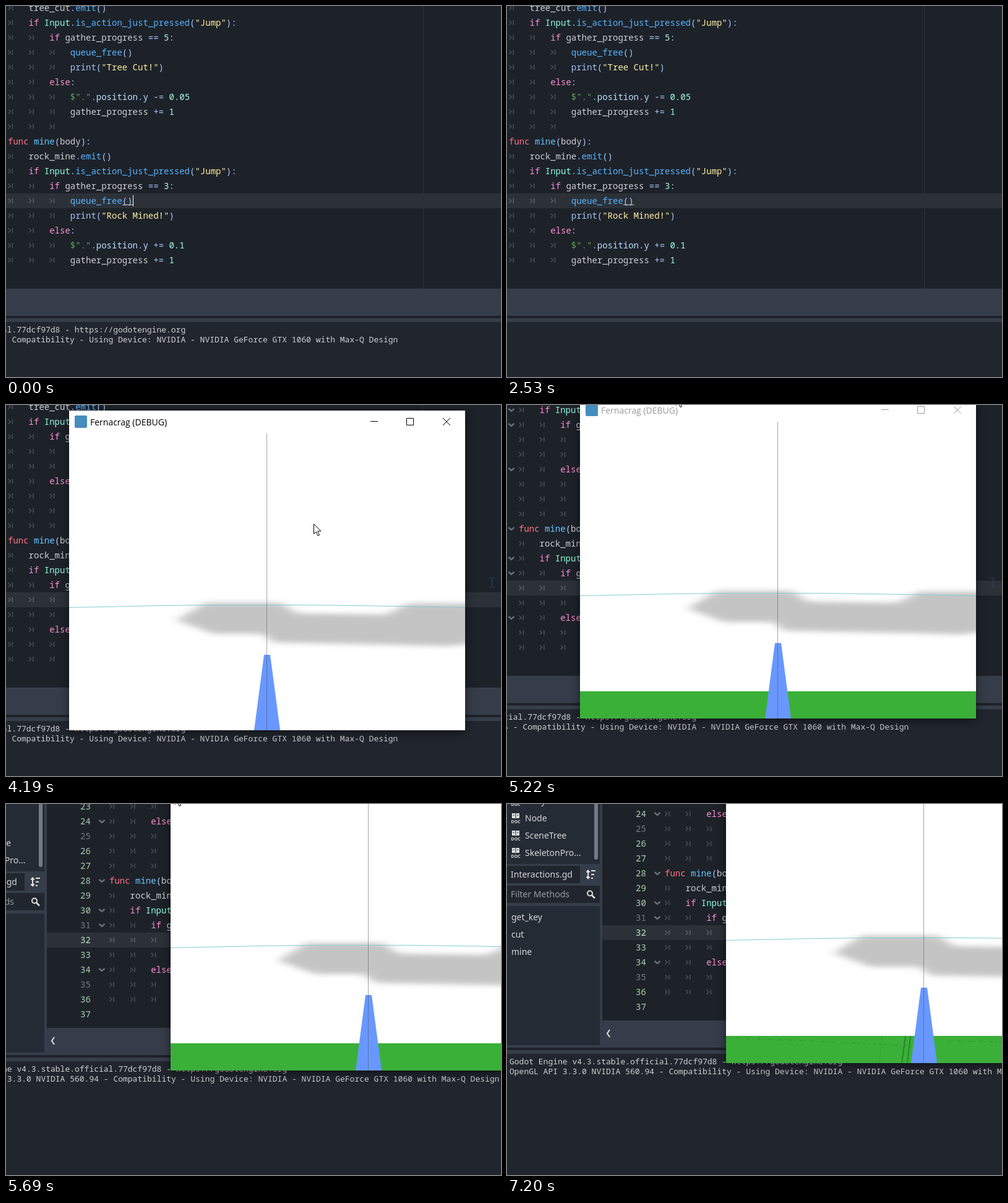
Recreate the animation shown at these times as an HTML page. Size 800 by 600 pixels, loop 8 s.

```html
<!DOCTYPE html>
<html lang="en">
<head>
<meta charset="utf-8">
<title>Script editor and game window</title>
<style>
html, body { margin: 0; width: 100%; height: 100%; overflow: hidden; background: #21262e; }
svg { display: block; width: 800px; height: 600px; }
text { white-space: pre; }
.code { font: 14px "Noto Sans Mono", "DejaVu Sans Mono", monospace; fill: #cdcfd2; }
.log { font: 13px "Noto Sans Mono", "DejaVu Sans Mono", monospace; fill: #cdcfd2; }
.ui { font: 14px "Noto Sans", "Open Sans", sans-serif; fill: #d2d4d8; }
.title { font: 14px "Open Sans", "Noto Sans", sans-serif; }
.line { fill: none; }
</style>
</head>
<body>
<svg viewBox="0 0 800 600">
  <defs>
    <filter id="soft" x="-20%" y="-60%" width="140%" height="220%"><feGaussianBlur stdDeviation="9 4"/></filter>
    <filter id="shade" x="-10%" y="-10%" width="120%" height="120%"><feGaussianBlur stdDeviation="8"/></filter>
    <clipPath id="view"><rect x="102" y="46" width="640" height="480"/></clipPath>
    <path id="tab" class="line" d="M3.5-3.5l3.5 3.5l-3.5 3.5M10.3-4v8" stroke-width="1.7"/>
    <path id="fold" class="line" d="M-13.5-2l4.5 4l4.5-4" stroke="#6a7078" stroke-width="2.4"/>
    <g id="doc">
      <path d="M8-8h5l1 1l1-1h5v8h-5l-1 1l-1-1h-5z" fill="#e0e0e0"/>
      <path class="line" d="M14-7v7M9.5-5h2.5M16-5h2.5" stroke="#252b34"/>
      <text x="6.6" y="8" font-family="Noto Sans, sans-serif" font-size="7" font-weight="800" fill="#e0e0e0">DOC</text>
    </g>
  </defs>
  <g id="scene">
    <rect x="-300" width="1200" height="720" fill="#21262e"/>
    <rect x="-300" width="1200" height="511" fill="#363d4a"/>
    <rect x="-300" y="501" width="1200" height="4" fill="#1d2229"/>
    <rect x="-98" width="998" height="457" fill="#1d2229"/>
    <rect x="-98" y="303" width="998" height="24" fill="#2c3138"/>
    <rect x="674" width="1" height="457" fill="#2b3037"/>
    <path class="line" d="M-86 472l-4 6l4 6" stroke="#e0e0e0" stroke-width="2"/>
    <g id="code" class="code"></g>
    <rect x="188" y="321" width="17" height="1" fill="#cdcfd2"/>
    <rect id="caret" x="205" y="306" width="1" height="18" fill="#fff"/>

    <g id="side" class="ui" transform="translate(-252 107)">
      <rect y="-110" width="150" height="207" fill="#252b34"/>
      <rect x="141" y="-110" width="6" height="200" rx="3" fill="#757a82"/>
      <rect y="100" width="118" height="28" fill="#21262e"/>
      <rect y="132" width="150" height="28" fill="#21262e"/>
      <rect y="165" width="150" height="225" fill="#252b34"/>
      <text x="6" y="119">Interactions.gd</text>
      <text x="6" y="151" fill="#959aa1">Filter Methods</text>
      <path class="line" d="M131 108v12M128.500 110.500l2.500-3l2.500 3M128.500 117.500l2.500 3l2.500-3M136 108h7M136 114h5M136 120h3" stroke="#e0e0e0" stroke-width="2"/>
      <circle cx="134" cy="144.500" r="4" fill="none" stroke="#e0e0e0" stroke-width="2"/>
      <path d="M137 147.500l5 5" stroke="#e0e0e0" stroke-width="2.500"/>
    </g>

    <g id="log" class="log">
      <text x="-248" y="528">Godot Engine v4.3.stable.official.77dcf97d8 - https://godotengine.org</text>
      <text x="-248" y="544">OpenGL API 3.3.0 NVIDIA 560.94 - Compatibility - Using Device: NVIDIA - NVIDIA GeForce GTX 1060 with Max-Q Design</text>
    </g>

    <g id="game">
      <rect x="102" y="15" width="640" height="515" fill="#000" opacity=".5" filter="url(#shade)"/>
      <rect x="102" y="9" width="640" height="517" fill="#fff"/>
      <rect id="icon" x="111" y="17" width="20" height="20" rx="2" fill="#478cbf"/>
      <text id="title" class="title" x="136" y="33">Fernacrag (DEBUG)</text>
      <path id="buttons" class="line" d="M589 26.500h12M647.500 21.500h11v11h-11zM706 21l12 12M718 21l-12 12"/>
      <rect id="splash" x="102" y="46" width="640" height="480" fill="#242424"/>
      <g id="world" clip-path="url(#view)">
        <path filter="url(#soft)" fill="#c4c4c4" d="M276 348L322 320H445L470 337L615 339L650 321H790V382L715 390L640 388L432 384L415 370H335Z"/>
        <path class="line" d="M102 327.500L180 326L245 324.500L336 323.500H494L600 325L742 327.500" stroke="#84ccd0"/>
        <g id="grass">
          <rect x="102" y="482" width="640" height="44" fill="#3ab038"/>
          <g id="marks" class="line" stroke="#237a23">
            <path d="M102 485Q240 490 400 498M460 490L742 496" stroke-dasharray="5 4 2 6" opacity=".6"/>
            <path d="M392 483L386 526M400 483L395 526" stroke-width="2" opacity=".75"/>
            <path d="M354 483L350 526" opacity=".3"/>
          </g>
        </g>
        <path d="M417 404h10L443 526H401Z" fill="#6898ff"/>
        <path id="axis" d="M421.500 46V526"/>
      </g>
    </g>
  </g>
  <path id="beam" class="line" d="M782 279.500h2.500l1 1l1-1h2.500M785.500 280v14M782 294.500h2.500l1-1l1 1h2.500" stroke="#34416c"/>
  <path id="mouse" d="M.5.500V16.500L4.200 13L7 19.500L9.500 18.400L6.800 12H12Z" fill="#fff" stroke="#000"/>
</svg>
<script>
const LOOP = 8000;
const $ = id => document.getElementById(id);

function add(parent, name, attrs, text) {
  const el = document.createElementNS("http://www.w3.org/2000/svg", name);
  for (const key in attrs) el.setAttribute(key, attrs[key]);
  if (text) el.textContent = text;
  return parent.appendChild(el);
}

// Syntax colours, tried in order at each position.
const SYNTAX = [
  [/^\$"\."/, "#5ea258"],
  [/^"[^"]*"/, "#ffeda1"],
  [/^(if|else)\b/, "#ff8ccc"],
  [/^func\b/, "#ff7085"],
  [/^Input\b/, "#8fffdb"],
  [/^mine\b/, "#66c8ff"],
  [/^print\b/, "#a3c2f5"],
  [/^[a-z_]+(?=\()/, "#57b3ff"],
  [/^(position|y)\b/, "#bce0ff"],
  [/^\d+(\.\d+)?/, "#a1ffe0"],
  [/^[.():+=-]+/, "#abc9ff"],
  [/^(\w+|\s+)/, "#cdcfd2"]
];

const FIRST = 19;
const SOURCE = `\ttree_cut.emit()
\tif Input.is_action_just_pressed("Jump"):
\t\tif gather_progress == 5:
\t\t\tqueue_free()
\t\t\tprint("Tree Cut!")
\t\telse:
\t\t\t$".".position.y -= 0.05
\t\t\tgather_progress += 1
\t\t\t
func mine(body):
\trock_mine.emit()
\tif Input.is_action_just_pressed("Jump"):
\t\tif gather_progress == 3:
\t\t\tqueue_free()
\t\t\tprint("Rock Mined!")
\t\telse:
\t\t\t$".".position.y += 0.1
\t\t\tgather_progress += 1
`.split("\n");

const CURRENT = 32, UNSAFE = [25, 31, 35];

SOURCE.forEach((raw, i) => {
  const number = FIRST + i, y = 3 + 24 * i, code = $("code");
  const body = raw.replace(/^\t+/, ""), depth = raw.length - body.length;
  const shade = number === CURRENT ? "#c4e2c8" : UNSAFE.includes(number) ? "#747a80" : "#a9cfae";
  add(code, "text", { x: -44, y: y + 5, fill: shade }, String(number));
  if (body.endsWith(":")) add(code, "use", { href: "#fold", y });
  for (let d = 0; d < depth; d++)
    add(code, "use", { href: "#tab", x: 33.6 * d, y, stroke: number === CURRENT ? "#565c64" : "#444b54" });
  const line = add(code, "text", { x: 3 + 33.6 * depth, y: y + 5 });
  for (let rest = body; rest;) {
    const [rule, fill] = SYNTAX.find(([re]) => re.test(rest));
    const word = rest.match(rule)[0];
    add(line, "tspan", { fill }, word);
    rest = rest.slice(word.length);
  }
});

["Body", "Node", "SceneTree", "SkeletonPro..."].forEach((name, i) => {
  add($("side"), "use", { href: "#doc", y: 23 + 28 * (i - 1) });
  add($("side"), "text", { x: 29, y: 28 + 28 * (i - 1) }, name);
});
["get_key", "cut", "mine"].forEach((name, i) =>
  add($("side"), "text", { x: 7, y: 188 + 28 * i }, name));

// Rows: time, x, y
const PAN = [[5030, 0, 0], [5220, 16, -19], [5370, 50, -53], [5690, 164, -95], [6080, 247, -107], [6190, 252, -107]];
const MOUSE = [[3750, 780, 280], [4190, 497, 192], [4560, 420, 110], [5000, 273, -16], [6400, 273, -16], [6480, 352, -17]];
const BLINKS = [480, 1030, 1550, 2050, 2530, 3000, 3370];

// Cubic path through the rows, resting at both ends.
function along(rows, t, c) {
  const last = rows.length - 1;
  if (t <= rows[0][0]) return rows[0][c];
  if (t >= rows[last][0]) return rows[last][c];
  const i = rows.findIndex(r => r[0] > t) - 1;
  const rate = j => (rows[j + 1][c] - rows[j][c]) / (rows[j + 1][0] - rows[j][0]);
  const slope = j => {
    if (j === 0 || j === last) return 0;
    const a = rate(j - 1), b = rate(j);
    return a * b > 0 ? 2 * a * b / (a + b) : 0;
  };
  const span = rows[i + 1][0] - rows[i][0], u = (t - rows[i][0]) / span, v = 1 - u;
  return rows[i][c] * v * v * (1 + 2 * u) + rows[i + 1][c] * u * u * (3 - 2 * u)
    + span * u * v * (slope(i) * v - slope(i + 1) * u);
}

const show = (id, on) => $(id).setAttribute("visibility", on ? "inherit" : "hidden");
const move = (id, rows, t) => $(id).setAttribute("transform",
  `translate(${Math.round(along(rows, t, 1))} ${Math.round(along(rows, t, 2))})`);

function draw(t) {
  const ready = t >= 3750, focused = t < 4900;
  show("caret", t < 3370 && BLINKS.filter(b => b <= t).length % 2 === 0);
  show("log", t < 1210 || ready);
  show("game", t >= 3370);
  show("icon", ready);
  show("splash", !ready);
  show("world", ready);
  show("grass", t >= 4570);
  show("marks", t >= 5900);
  show("beam", ready && t < 5390);
  show("mouse", ready && t < 6480);
  $("title").setAttribute("fill", focused ? "#000" : "#999");
  $("buttons").setAttribute("stroke", focused ? "#000" : "#999");
  $("axis").setAttribute("stroke", t >= 5900 && t < 7200 ? "rgba(40,160,165,.6)" : "rgba(70,80,85,.5)");
  move("scene", PAN, t);
  move("mouse", MOUSE, t);
}

const start = performance.now();
function tick() {
  draw((performance.now() - start) % LOOP);
  requestAnimationFrame(tick);
}
tick();
</script>
</body>
</html>
```
